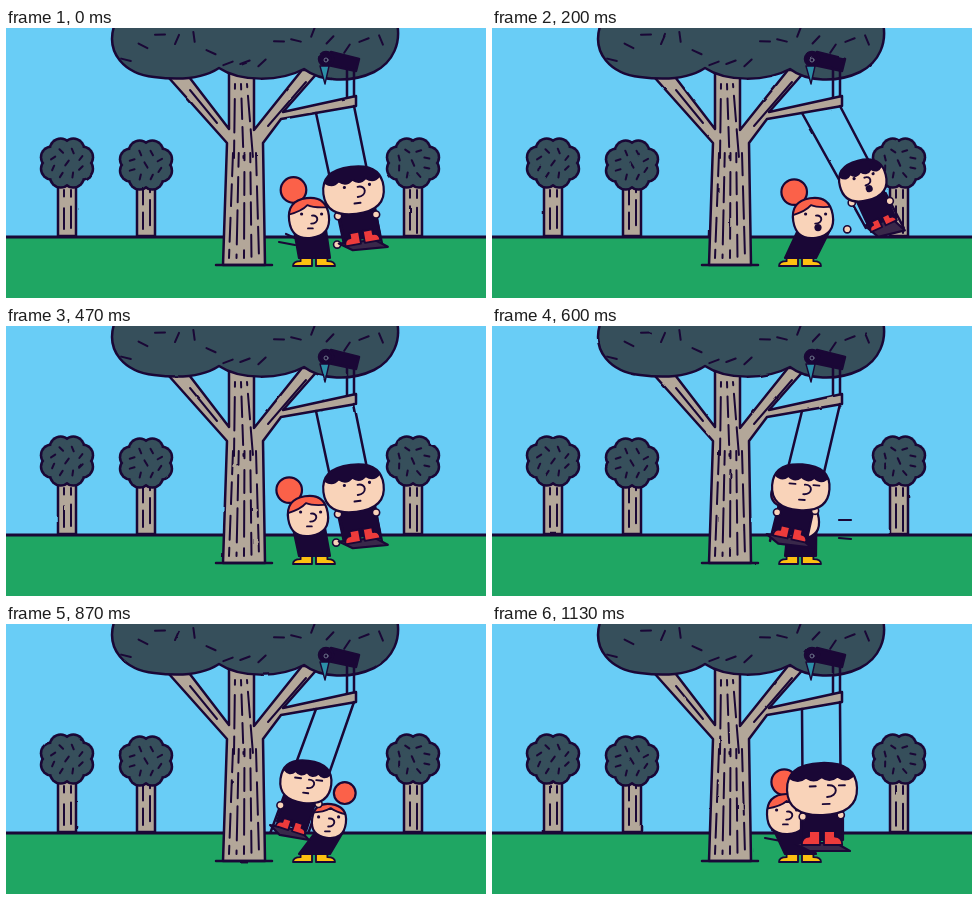
These frames come from a looping animation (480x270 px, 1190 ms). An HTML page:

```html
<!DOCTYPE html>
<html lang="en">
<head>
<meta charset="utf-8">
<title>Swing</title>
<style>
html, body { margin: 0; height: 100%; overflow: hidden; background: #69cdf6; }
svg { display: block; width: 100vw; height: 100vh; }
</style>
</head>
<body>
<svg viewBox="0 0 480 270" stroke="#1a0736" stroke-width="2.5" stroke-linecap="round" stroke-linejoin="round" fill="none">
  <filter id="boil" filterUnits="userSpaceOnUse" x="0" y="0" width="480" height="270" color-interpolation-filters="sRGB">
    <feTurbulence id="noise" type="fractalNoise" baseFrequency=".09"/>
    <feDisplacementMap in="SourceGraphic" scale="2" xChannelSelector="R" yChannelSelector="G"/>
  </filter>
  <path d="M-5 209H485V275H-5Z" fill="#1fa663" stroke-width="3"/>
  <g id="trees" filter="url(#boil)"></g>
  <g id="ropes" filter="url(#boil)"></g>
  <g id="kids" stroke-width="2.2"></g>
</svg>
<script>
const INK = '#1a0736', LEAF = '#364f5b', BARK = '#b3a799', SKIN = '#f9d3b9';
const HAIR = '#fb6149', YELLOW = '#fdc010', RED = '#ed3b3b';
const LOOP = 1190, STEPS = 18;
const $ = id => document.getElementById(id);
const range = n => [...Array(n).keys()];
const path = (d, fill = 'none', more = '') => `<path d="${d}" fill="${fill}" ${more}/>`;
const dot = (x, y, r, fill, more = '') => `<circle cx="${x}" cy="${y}" r="${r}" fill="${fill}" ${more}/>`;
const place = (x, y, turn, inner) => `<g transform="translate(${x} ${y}) rotate(${turn})">${inner}</g>`;

let seed = 7;
const rnd = (lo, hi) => lo + (hi - lo) * ((seed = seed * 16807 % 2147483647) / 2147483647);

// n dashed lines spread from a..b at y1 to c..d at y2
const bark = (a, b, y1, c, d, y2, n) => range(n).map(i => {
  const u = i / (n - 1);
  return path(`M${a + (b - a) * u} ${y1}L${c + (d - c) * u} ${y2}`, 'none',
    `stroke-width="2" stroke-dasharray="${rnd(15, 45)} ${rnd(7, 12)} ${rnd(15, 35)} 8" stroke-dashoffset="${rnd(0, 40)}"`);
}).join('');

function tick(x, y, size) {
  const a = rnd(0, Math.PI), dx = Math.cos(a) * size, dy = Math.sin(a) * size;
  return path(`M${x - dx} ${y - dy}L${x + dx} ${y + dy}`, 'none', 'stroke-width="2"');
}

function smallTree(x, y) {
  const ring = (n, rx, ry, part) => range(n).map(k => {
    const a = (k + .5) * 2 * Math.PI / n;
    return part(x + rx * Math.cos(a), y + ry * Math.sin(a));
  }).join('');
  const crown = (r, c) => ring(8, 16.5, 15, (bx, by) => dot(bx, by, r, c, 'stroke="none"'));
  return path(`M${x - 9} 208V150h18V208Z`, BARK) + bark(x - 3, x + 4, 162, x - 3, x + 4, 205, 2) +
    crown(12, INK) + crown(9.5, LEAF) + dot(x, y, 13, LEAF, 'stroke="none"') +
    ring(8, 15, 13, (bx, by) => tick(bx, by, 2.5)) + tick(x, y, 3);
}

$('trees').innerHTML = [[61, 135], [140, 137], [407, 135]].map(p => smallTree(...p)).join('') +
  path(`M217 237L221 115L163 50L180 45L223 101V40H248V102L296 42H314L277 84L350 68V78L275 91L257 115L259 237Z`, BARK) +
  path('M210 237H266') + path('M184 62L211 95M300 54L262 98', 'none', 'stroke-width="2"') +
  bark(229, 241, 56, 228, 247, 130, 3) + bark(227, 250, 125, 223, 253, 230, 5) +
  path(`M109 -5C98 26 120 46 148 49C178 53 198 50 213 40C234 54 274 54 298 41C315 54 345 55 368 44
    C388 34 395 14 391 -5Z`, LEAF) +
  range(16).map(i => tick(120 + i * 17, rnd(4, 38), 5)).join('') +
  path('M341 42V69M348 42V68') +
  path('M325 24L353 31L350 43L322 37Z', INK) + dot(320, 31, 7, INK) +
  path('M314 38L323 38L319 56Z', '#2c8fa8', 'stroke-width="1.4"') +
  dot(320, 32, 2, INK, 'stroke="#7d8b9c" stroke-width=".8"');

// Long sweep to the right, longer hang on the left
function swingAngle(step) {
  const w = Math.sin(2 * Math.PI * (step + 1) / STEPS);
  return w > 0 ? -28 * w ** .85 : 20 * (-w) ** .35;
}

function head(id, rx, ry, hair, color) {
  const k = .66, cx = rx * k, cy = ry * k;
  const d = `M${-rx} 0C${-rx} ${-cy} ${-cx} ${-ry} 0 ${-ry}S${rx} ${-cy} ${rx} 0S${cx} ${ry} 0 ${ry}S${-rx} ${cy} ${-rx} 0Z`;
  return `<clipPath id="${id}">${path(d)}</clipPath>` + path(d, SKIN, 'stroke="none"') +
    path(hair, color, `clip-path="url(#${id})" stroke-width="1.8"`) + path(d);
}

function face(x, s, sleepy, open) {
  const eye = ex => sleepy ? path(`M${ex - 3} -3h6`) : dot(ex, -4, 1.6, INK, 'stroke="none"');
  const mouth = open ? dot(x + 2, 12 * s, 4.5 * s, INK, 'stroke="none"') : path(`M${x - 5 * s} ${13 * s}h${6 * s}`);
  return `<g stroke-width="1.9">${eye(x - 13 * s) + eye(x + 12 * s) + mouth}
    ${path(`M${x} ${-3 * s}c${9 * s} -1 ${9 * s} ${10 * s} ${-s} ${10 * s}`)}</g>`;
}

function boots(x, y, w, h, fill) {
  const boot = side => path(`M${x + side * 2} ${y}v${-h}h${side * w * .6}v${h * .4}
    q${side * w * .4} 0 ${side * w * .4} ${h * .6}Z`, fill, 'stroke-width="1.8"');
  return boot(-1) + boot(1);
}

function boy(step) {
  const angle = swingAngle(step), a = angle * Math.PI / 180;
  const near = Math.exp(-((angle / 16) ** 2));
  const rx = 23 + 12 * near, ry = 20 + 6 * near, len = 135 + 8 * near, neck = 52 + 6 * near;
  const sx = 330 - len * Math.sin(a), sy = 80 + len * Math.cos(a);
  const half = rx * .8, w = rx * .6;
  const ropes = [[310, 85, -19], [348, 78, 19]].map(([x, y, end]) => ({ x, y, dx: sx + end - x, dy: sy - y }));
  const hands = ropes.map(r => dot(r.x + r.dx * .78, r.y + r.dy * .78, 3.6, SKIN, 'stroke-width="1.6"')).join('');
  const depth = 4 + Math.max(0, -angle - 12) * .2;
  const fringe = `M-40 -40H40V${-ry * .45}H${rx * .9}` + `q${-rx * .22} 6 ${-rx * .45} 0`.repeat(4) + 'H-40Z';
  const seat = path(`M${-half} ${-depth}H${half * .5}L${half} ${depth}H${-half * .45}Z`, '#39284a');
  const torso = path(`M${-w} ${ry - neck - 7}H${w}V-7H${-w}Z`, INK) + boots(0, -2, half * .65, 9 + 5 * near, RED);
  return {
    ropes: ropes.map(r => path(`M${r.x} ${r.y}l${r.dx} ${r.dy}`)).join(''),
    body: place(sx, sy, angle * .5, seat) + place(sx, sy, angle * .9, torso) + hands +
      place(sx + neck * Math.sin(a * .9), sy - neck * Math.cos(a * .9), angle * .45 - 2,
        head('boyHead', rx, ry, fringe, INK) + face(2 + 4 * near, rx / 30, step > 7, angle < -20))
  };
}

// step, head x, bun angle
const GIRL = [[0, 303, -29], [3, 321, -36], [7, 302, -36], [9, 309, -35], [11, 321, 15], [15, 325, 44], [17, 295, -5], [18, 303, -29]];

function ease(keys, step) {
  const j = keys.findIndex(k => k[0] > step), from = keys[j - 1], to = keys[j];
  const u = (1 - Math.cos(Math.PI * (step - from[0]) / (to[0] - from[0]))) / 2;
  return from.map((v, c) => v + (to[c] - v) * u);
}

function girl(step) {
  const angle = swingAngle(step), crouch = Math.max(0, angle), reach = Math.max(0, -angle);
  const [, x, bun] = ease(GIRL, step);
  const y = 190 + crouch * .35, r = 20 - crouch * .15, b = bun * Math.PI / 180;
  const cap = 'M-30 -30H30V-8Q8 -8 0 -13Q-8 -6 -30 -5Z';
  return path(`M${x - r * .75} ${y + r * .6}h${r * 1.6}L324 230H293Z`, INK) +
    boots(308, 238, 19, 8, YELLOW) +
    (reach > 5 ? dot(x + 24 + reach * .37, 227 - reach * .93, 3.6, SKIN, 'stroke-width="1.6"') : '') +
    dot(x + 32 * Math.sin(b), y - 32 * Math.cos(b), r * .64, HAIR) +
    place(x, y, bun * .25, head('girlHead', r, r, cap, HAIR)) +
    place(x, y, 0, face(crouch ? 0 : 3, .8, false, angle < -20));
}

function swish(step) {
  const size = 12 - 4 * (step - 9);
  if (step >= 9 && size > 0) return path(`M347 194h${size}M347 212l${size} 1`);
  return step % 17 ? '' : path('M280 206l9 4M273 214l16 3');
}

const startOf = step => Math.round(step * 20 / 3) * 10;
let shown = -1;
function draw() {
  const t = performance.now() % LOOP;
  let step = STEPS - 1;
  while (startOf(step) > t) step--;
  if (step !== shown) {
    shown = step;
    const rider = boy(step);
    $('noise').setAttribute('seed', step + 1);
    $('ropes').innerHTML = rider.ropes;
    $('kids').innerHTML = swish(step) + girl(step) + rider.body;
  }
  requestAnimationFrame(draw);
}
draw();
</script>
</body>
</html>
```
